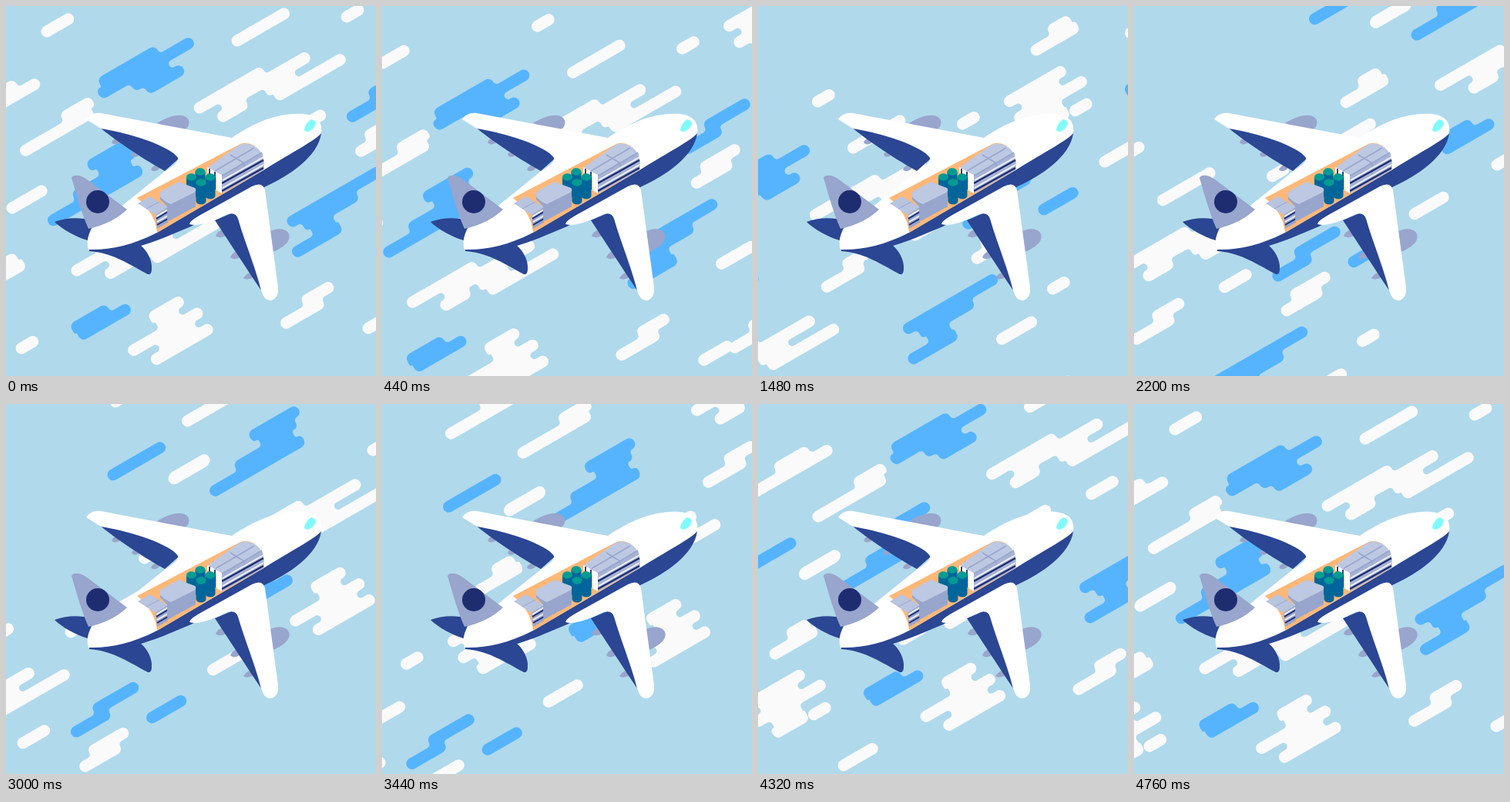
Write an HTML page that moves like this. It is 480 by 480 pixels and loops after 4.8 s.

```html
<!DOCTYPE html>
<html lang="en">
<head>
<meta charset="utf-8">
<title>Cargo flight</title>
<style>
html, body { margin: 0; width: 100%; height: 100%; overflow: hidden; background: #b0d9ec; }
svg { display: block; width: 100vw; height: 100vh; }
</style>
</head>
<body>
<svg viewBox="0 0 480 480">
  <rect width="480" height="480" fill="#b0d9ec"/>
  <g id="sky" stroke-width="2.6" stroke-linejoin="round"></g>

  <!-- engines and flap fairings -->
  <g fill="#98a5cc">
    <path d="M196 152C207 145 219 141 228 142C237 143 240 151 235 158L226 164Z"/>
    <path d="M342 293C350 288 361 288 366 294C371 302 364 312 346 319Z"/>
    <path d="M137 177C139 172 144 170 150 172L147 178C143 180 139 180 137 177Z"/>
    <path d="M163 193C165 188 170 186 176 188L174 193C170 196 165 197 163 193Z"/>
    <path d="M188 212C190 207 196 205 202 208L198 212C194 215 190 215 188 212Z"/>
    <path d="M272 298C274 293 280 289 287 290L289 296C284 300 276 302 272 298Z"/>
    <path d="M291 326C293 321 298 317 304 317L307 323C302 328 295 330 291 326Z"/>
    <path d="M308 353C311 348 316 345 322 344L323 350C319 354 312 356 308 353Z"/>
  </g>

  <!-- far wing -->
  <path fill="#2b4692" d="M121 157C138 171 170 194 206 214L224 198L205 178L150 160Z"/>
  <path fill="#fff" d="M104 147C108 141 114 138 123 139L293 171L304 205L205 230C200 222 207 214 218 206C224 201 225 197 220 193C198 176 154 164 123 159Z"/>

  <!-- tail planes -->
  <path fill="#2b4692" d="M63 280C78 274 95 274 114 278L106 304C89 299 72 289 63 280Z"/>
  <path fill="#2b4692" d="M108 316L174 310C183 317 190 330 189 341Q189 349 184 348C153 331 136 320 108 318Z"/>

  <!-- fuselage -->
  <path fill="#2b4692" d="M108 317C140 323 176 312 204 301L240 286L337 234C368 220 405 195 409 165L330 190L180 275Z"/>
  <path fill="#fff" d="M107 316C104 307 106 294 115 283L152 258L208 213L293 171C318 154 345 141 374 140C398 138 412 147 409 165C402 174 369 191 334 213L196 294C163 311 133 317 107 316Z"/>
  <path fill="#80fbfb" d="M387 160Q389 151 396 147Q401 148 402 152Q400 160 392 163Q387 163 387 160Z"/>

  <!-- fin -->
  <path fill="#98a5cc" d="M85 223C87 218 97 219 105 225L157 264C146 275 127 285 107 289C98 269 91 243 85 223Z"/>
  <circle cx="119" cy="254" r="15" fill="#1e2d70"/>

  <!-- cargo bay -->
  <path fill="#ffb878" d="M170 249L302 180Q311 175 322 181Q336 194 334 213L196 294Q194 269 170 249Z"/>
  <g stroke-linejoin="round">
    <path fill="#b9c4df" d="M171 256L187 247L210 261L194 271Z"/>
    <path fill="#98a5cc" d="M194 271L210 261V281L196 289Z"/>
    <path fill="none" stroke="#f2f4fb" stroke-width="2" d="M195 273L210 264M196 280L210 272"/>
    <path fill="none" stroke="#1e2d70" stroke-width="2" d="M195 276L210 267M196 284L210 276"/>
    <path fill="none" stroke="#98a5cc" d="M182 263L199 254"/>

    <path fill="#bdc8e2" d="M262 209L303 180Q316 175 328 186Q335 196 334 204L281 231V221Z"/>
    <path fill="#a8b4d5" d="M280 219L332 190Q336 202 334 213L280 243Z"/>
    <path fill="none" stroke="#98a5cc" stroke-width="1.5" d="M262 211L281 220L332 190M271 214L322 184M291 193L309 204V226"/>
    <path fill="none" stroke="#f2f4fb" stroke-width="1.5" d="M281 226L334 196M281 236L334 206"/>
    <path fill="none" stroke="#1e2d70" stroke-width="2.4" d="M280 230L334 200M280 240L334 210"/>
    <path fill="#fff" d="M261 209L280 219V243L273 239V222L261 216Z"/>
    <path fill="none" stroke="#1e2d70" stroke-width="1.8" d="M264 211V219M271 215V238"/>

    <g id="drums"></g>

    <path fill="#98a5cc" d="M200 244L211 254L246 238V260L213 278Q209 281 209 274V260L200 251Z"/>
    <path fill="#bdc8e2" d="M200 244Q199 241 204 239L224 228L245 236Q248 239 244 242L214 257Q209 256 200 248Z"/>
  </g>

  <!-- near wing -->
  <path fill="#2b4692" d="M271 278L299 266L322 318L331 369C315 345 292 310 271 278Z"/>
  <path fill="#fff" d="M238 283C239 277 253 271 265 264L319 234Q333 227 336 239L353 365Q354 379 344 382Q335 383 331 369C325 343 309 304 301 276Q298 267 288 270C272 277 252 287 238 283Z"/>
</svg>
<script>
const NS = 'http://www.w3.org/2000/svg';
const WHITE = '#fafafa', BLUE = '#56b4ff';
const LOOP = 4800, STEP = 40, TRAVEL = 4760;
const DX = -568, DY = 447.2;
const PITCH = 12.4, R = PITCH / 2;
const sky = document.getElementById('sky');

function add(parent, tag, attrs) {
  const el = document.createElementNS(NS, tag);
  for (const k in attrs) el.setAttribute(k, attrs[k]);
  return parent.appendChild(el);
}

// Outline of stacked rows [start, end] with every corner rounded.
function outline(rows) {
  const right = [], left = [];
  rows.forEach(([a, b], i) => {
    const top = i * PITCH - R, low = top + PITCH;
    right.push([b + R, top], [b + R, low]);
    left.unshift([a - R, low], [a - R, top]);
  });
  const pts = right.concat(left), n = pts.length;
  let d = '';
  pts.forEach(([x, y], i) => {
    const [px, py] = pts[(i + n - 1) % n], [qx, qy] = pts[(i + 1) % n];
    const l1 = Math.hypot(x - px, y - py), l2 = Math.hypot(qx - x, qy - y);
    const r = Math.min(R, l1 / 2, l2 / 2);
    const ux = (x - px) / l1, uy = (y - py) / l1, vx = (qx - x) / l2, vy = (qy - y) / l2;
    const sweep = ux * vy - uy * vx > 0 ? 1 : 0;
    d += `${i ? 'L' : 'M'}${x - ux * r} ${y - uy * r}A${r} ${r} 0 0 ${sweep} ${x + vx * r} ${y + vy * r}`;
  });
  return d + 'Z';
}

function cloud(color, x, y, rows) {
  add(sky, 'path', {
    d: outline(rows), fill: color, stroke: color,
    transform: `translate(${x} ${y}) rotate(-30)`
  });
}

// A cloud that is in view again when the loop closes.
function twin(color, x, y, rows) {
  cloud(color, x, y, rows);
  cloud(color, x - DX, y - DY, rows);
}

// A long cloud with a short finger below its left half.
function bank(x, y, finger, tip) {
  twin(WHITE, x, y, [[0, 89], [finger + 12, tip], [finger, finger + 28]]);
  twin(WHITE, x + R, y + PITCH * 0.866, [[72, tip], [92, 122], [99, 189]]);
}

const pill = len => [[0, len]];
const HOOK = [[0, 31], [-39, 9]];

twin(BLUE, 128, 97, [[0, 72], [-8, 118], [34, 75], [48, 89]]);
twin(BLUE, 113, 205, [[0, 58], [8, 46], [-36, 36], [-81, 44]]);
twin(BLUE, 372, 279, [[0, 125], [16, 82], [22, 40], [-14, 43]]);
twin(BLUE, 92, 416, [[0, 40], [3, 65]]);
cloud(BLUE, 483, 109.5, [[-6, 46], [-46, -4]]);
cloud(BLUE, 547.5, 125, pill(43));
cloud(BLUE, 497, -190, pill(70));

bank(251, 132, 21, 150);
bank(92, 343, 36, 167);
twin(WHITE, 391, 381, HOOK);
twin(WHITE, 293.5, 195, HOOK);
twin(WHITE, -24, 122.5, [[0, 36], [-58, 63]]);
twin(WHITE, 79, 142, [[0, 31], [-69, 24]]);
twin(WHITE, -8, 338, [[0, 18], [-33, 22]]);
twin(WHITE, 193, 402, [[0, 35], [4, 22], [-46, 49], [-8, 32], [-26, 50]]);
twin(WHITE, 53, 33, pill(32));
twin(WHITE, 300, 45, pill(70));
twin(WHITE, 442, 14, pill(17));
twin(WHITE, 380, 158, pill(32));
twin(WHITE, 8, 262, pill(44));
twin(WHITE, 20, 444, pill(17));
twin(WHITE, 470, 418, pill(35));
cloud(WHITE, 483, 161, [[-12, 31], [-33, 12]]);
cloud(WHITE, 503, -15.5, [[0, 76], [18, 60], [1, 93], [22, 50], [16, 52]]);
cloud(WHITE, 535, 373, [[0, 50], [-36, 40]]);
cloud(WHITE, 254, -15, pill(17));
cloud(WHITE, 577, -187, pill(44));
cloud(WHITE, 559, 228, pill(17));
cloud(WHITE, 493, 293, pill(44));
cloud(WHITE, 626.5, 63, pill(43));

const drums = document.getElementById('drums');
for (const [x, y] of [[252, 215], [240.5, 222], [265, 222], [253, 229]]) {
  add(drums, 'path', { d: `M${x - 6.5} ${y}v24a6.5 4.5 0 0 0 13 0v-24Z`, fill: '#00669a' });
  add(drums, 'ellipse', { cx: x, cy: y, rx: 6.5, ry: 4.7, fill: '#009b94' });
}

function draw() {
  const t = Math.floor((performance.now() % LOOP) / STEP) * STEP;
  const k = t / TRAVEL;
  sky.setAttribute('transform', `translate(${DX * k} ${DY * k})`);
  requestAnimationFrame(draw);
}
draw();
</script>
</body>
</html>
```
